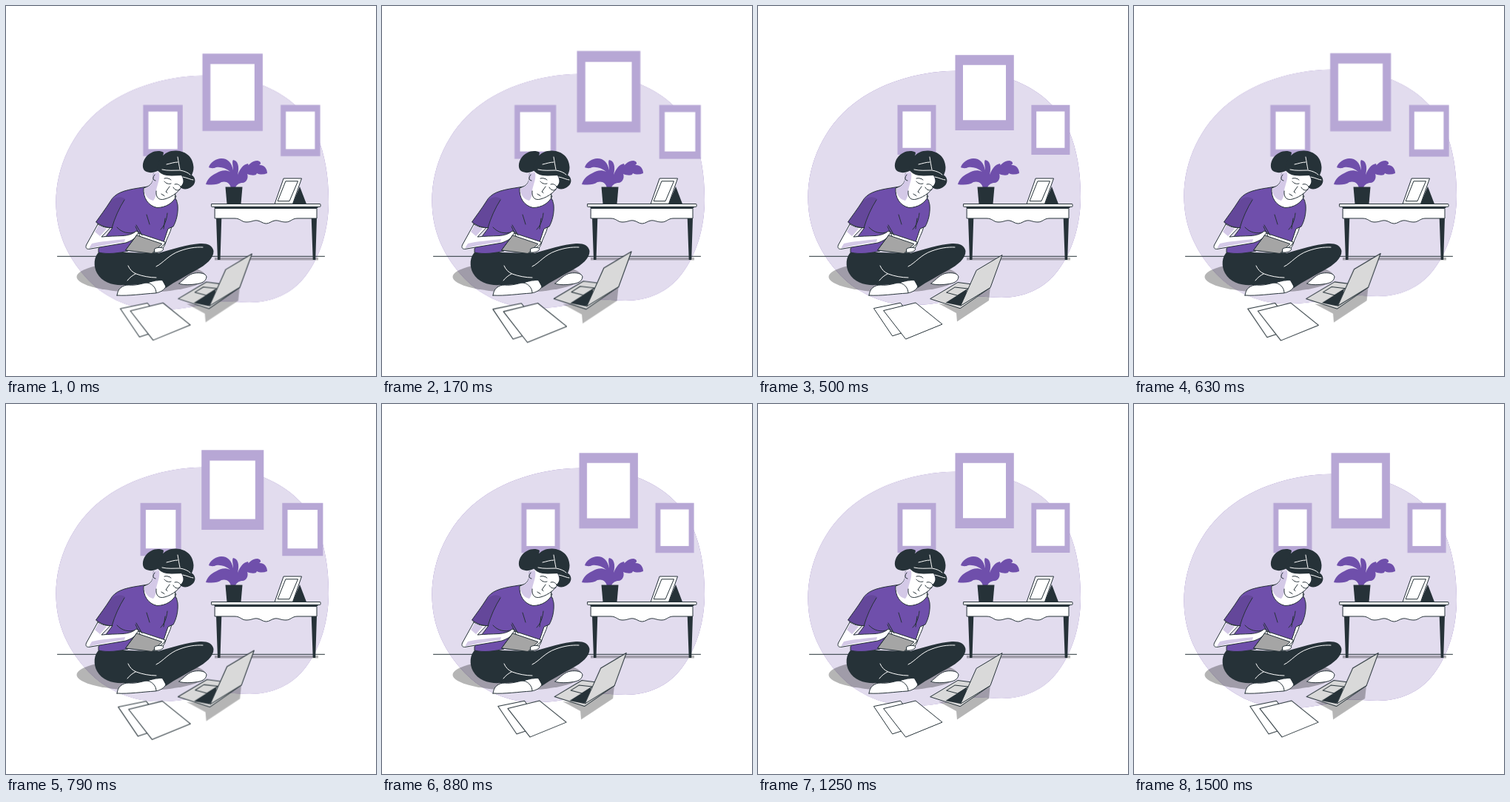
These frames come from a looping animation (500 px wide and 500 px high, 1.54 s). An HTML page:

```html
<!DOCTYPE html>
<html lang="en">
<head>
<meta charset="utf-8">
<title>Sketching at home</title>
<style>
  /* A registered number keeps the scaled line art crisp. */
  @property --size { syntax: "<number>"; inherits: false; initial-value: 1; }

  html, body { margin: 0; width: 100%; height: 100%; overflow: hidden; background: #fff; }
  svg { display: block; width: 100%; height: 100%; }
  .purple { fill: #6f4fab; }
  .tint { fill: #fff; opacity: .8; }
  .frame { fill: #b7a7d5; }
  .lilac { fill: #d4c9e7; }
  .dark { fill: #263238; }
  .white { fill: #fff; }
  .grey { fill: #d9d9d9; }
  .shade { fill: #000; opacity: .29; }
  .soft { fill: #000; opacity: .1; }
  .ink { stroke: #263238; stroke-width: 1; stroke-linejoin: round; stroke-linecap: round; }
  .line { fill: none; }
  .chalk { fill: none; stroke: #fff; stroke-width: 1; stroke-linecap: round; }
  .float { animation: float 1540ms linear -41ms infinite; }
  .beat { animation: beat 1540ms linear -41ms infinite; transform: scale(var(--size)); }
  .pictures { transform-origin: 305px 133.5px; }
  .desk { transform-origin: 243.5px 393px; }
  @keyframes float {
    0%, 100% { transform: translateY(0); }
    50% { transform: translateY(-10px); }
  }
  @keyframes beat {
    0%, 30%, 40%, 60%, 100% { --size: 1; }
    10%, 50% { --size: 1.1; }
  }
</style>
</head>
<body>
<svg viewBox="0 0 500 500">
  <defs>
    <path id="blob" d="M265 94.700C300 94 325 99 350 109C385 124 408 147 420 175C431 201 436 230 436 265C436 302 425 339 405 365C387 389 360 401 329 401C310 401 295 397 275 402C250 408 225 412 200 411C165 409 130 393 107 366C82 338 67.500 305 67.500 266C67.500 218 90 170 128 140C163 112 214 95.500 265 94.700Z"/>
  </defs>

  <g class="float">
    <use href="#blob" class="purple"/>
    <use href="#blob" class="tint"/>
  </g>

  <g class="beat pictures">
    <path class="frame" d="M266.500 66.200h79.300V168h-79.300zM188.500 133.700h52v67.400h-52zM369.400 133.700h52v67.400h-52z"/>
    <path class="white" d="M277 79.800h58v74.500h-58zM195.400 142.500h38.200v49.300h-38.200zM376.200 142.500h38.200v49.300h-38.200z"/>
  </g>

  <path class="ink line" d="M69.500 338.300H430.500"/>

  <!-- side table -->
  <g>
    <rect class="shade" x="282" y="340" width="140" height="3.500"/>
    <path class="dark" d="M284 286h7.300l-1.800 57h-3.500zM412.700 286h7.300l-1.800 57h-3.500z"/>
    <path class="white ink" d="M282.500 273.500H420V287H394C386 287 385 292 378 292C371 292 368 289 363 290C358 291 356 294 351.500 294C347 294 345 291 340 290C335 289 332 292 325 292C318 292 317 287 309 287H282.500Z"/>
    <path class="dark" d="M281.500 271h140v2h-140z"/>
    <rect class="white ink" x="277.500" y="267.500" width="147.500" height="3.800" rx=".6"/>
    <path class="dark" d="M397 244L406 267.500H387Z"/>
    <path class="white ink" d="M375.500 233H399.500L387.500 267.300H363.500Z"/>
    <path class="white ink" d="M378.300 236.700H394.500L383 263.700H367.500Z"/>
  </g>

  <!-- plant -->
  <g>
    <path class="purple" d="M304 246C303 239 297 236 291 238C286 242 277 242 270 241C272 234 277 229 284 226C290 222 297 221 303 224C297 219 290 217 284 218C280 220 276 219 274 218C276 211 284 206 291 206C300 206 305 212 307 222C307 216 305 210 307 208C313 209 316 216 313 228C316 221 320 214 327 213C329 216 325 219 322 223C327 215 332 209 340 209C344 210 346 213 342 215C349 214 353 220 353 226C348 228 343 228 339 226C338 230 331 229 326 227C328 232 325 240 318 239C314 240 311 242 310 246Z"/>
    <path class="dark" d="M296.500 244.500H319.500L317.500 267.500H298.500Z"/>
  </g>

  <!-- woman -->
  <g>
    <ellipse class="shade" cx="183" cy="366" rx="87.500" ry="21"/>

    <path class="white ink" d="M234 375C241 369 247 362 255 361C262 360 270 361 271 366C270 373 264 375 255 376C247 377 238 377 234 375Z"/>
    <path class="dark" d="M127 331C118 338 118 352 123 361C130 374 146 378 160 377C175 377 185 375 194 374L216 381C229 372 243 365 257 357C270 350 281 341 280.500 331C279 323 272 320.500 262 321C245 322 224 329 206 334L160 333Z"/>
    <path class="white ink" d="M150 391C151 382 157 377 166 377C176 378 183 375 190 374L202 371L212 370L216 379C214 384 208 387 202 388C185 389 166 392 150 391Z"/>
    <path class="ink line" d="M190 374C196 374 203 380 203 387.500"/>
    <path class="dark" d="M188 371C195 374 207 371 214 369L217 381L211 371C204 370 197 373 190 374Z"/>
    <path class="chalk" d="M165 351C167 356 171 360 176 362C184 365 194 367 203 367M175 362C171 364 167 367 164 371M203 352C213 347 220 336 235 331C246 327 256 325.500 266 326"/>

    <path class="white ink" d="M213 301L224 298C222 307 217 314 215 322C212 329 207 334 200 334L197 326Z"/>
    <path class="purple ink" d="M179 246C159 249 147 253 141 264C134 275 127 284 121.500 292C128 297 136 300 144 299.500L134 313L125 328V333C138 336 152 334 165 331L179 309L213 319L219 301L226 298C230 291 233 280 232 269C231 263 229 260 226 257L193 244Z"/>
    <path class="soft" d="M141 264C134 275 127 284 121.500 292C128 297 136 300 144 299.500C147 286 153 272 161 261C157 257 149 257 141 264Z"/>
    <path class="ink line" d="M160 262C153 273 147 286 143 300M150 299C156 306 166 309 176 305M190 282L194 295M213 301L215 287M218 280C217 290 214 297 209 302"/>

    <path class="white ink" d="M124 295L108.500 323C107 327 109 329 113 328.300L162 320C168 318 173 315 178 311L182 307L176 304C172 308 165 310 158 310.500C148 311 139 311 129 312L141 299.500C135 300 129 298 124 295Z"/>
    <path class="lilac" d="M125 296L120 305L127 311L136 301ZM112 327.600C125 325 145 320 160 319L161 315C145 317 128 318 116 321Z"/>

    <path class="white ink" d="M179 307L215.500 319L213 323L199 334L162 330Z"/>
    <path fill="#a5a5a5" class="ink" d="M177 310L211 321.500L197 334.500L162 330Z"/>
    <path class="ink line" d="M176 296L184 310M175 298L181 311"/>
    <path class="white ink" d="M201 328C204 326 208 326 212 327C215 329 209 334 201 333Z"/>

    <path class="white ink" d="M199 227C200 237 197 243 186 246C185 259 192 270 204 272.500C216 272.500 226 266 230 257L222 248Z"/>
    <path class="lilac" d="M198 227C200 237 197 243 187 246.500L187 252C190 259 194 262 199 263C203 259 204 247 209 239V225Z"/>
    <path class="white" d="M206 222C210 232 204 241 203 250C202 258 206 263 214 261C226 258 236 249 240 238L235 224Z"/>
    <path class="ink line" d="M203 250C202 259 207 263 214 261C226 258 236 249 240 239M214 237C216 240 220 241 223 240M226 245C228 249 232 250 235 248M214 233C217 232 221 233 223 235M228 241C231 240 234 241 236 244M221 244L216 251L218 252.500M210 254L214 256.500M201 228C198 232 198 235 202 236M229 254C227 258 229 261 231 263"/>

    <path class="dark" d="M213 198C206 193.500 194 197 188.500 205C184 211 183.500 220 188 223C195 227 203 225 209 220Z"/>
    <path class="dark" d="M204 221C206 206 214 195 230 195.500C244 196 253 205 253.500 218C253.500 223 252 226 251 228.500C257 232 257.500 241 249 245.500C243 249 237 247 235 244.500C240 242 241 235 237 229C230 229 224 230 217 229C211 228 207 225 204 221Z"/>
    <path class="chalk" d="M232 204C233 210 234 216 235 221M217 214C222 213 227 211 232 211M211 221C219 223 227 222 235 222C241 223 246 225 249 228M239 231C245 232 250 235 253 235"/>
  </g>

  <!-- laptop and sheets -->
  <g class="beat desk">
    <path class="shade" d="M244 402L268 415L269 426.500L312 398L314 379L274 405Z"/>
    <path class="grey ink" d="M233 395.500L270 373.500L297 377L314 380.500L273.500 408.500Z"/>
    <path class="dark" d="M253.500 401L282 383L281 396L273 405Z"/>
    <path class="ink line" d="M255 387L266 380L284 382L270 391Z"/>
    <path class="grey ink" d="M295.500 357L330 336.500L314 380.500L274 405Z"/>
    <path class="white ink" d="M156.800 408.500L192.500 401.200L218 434L182 445.800Z"/>
    <path class="white ink" d="M170 411.500L213 401L249 430L200 450Z"/>
  </g>
</svg>
</body>
</html>
```
